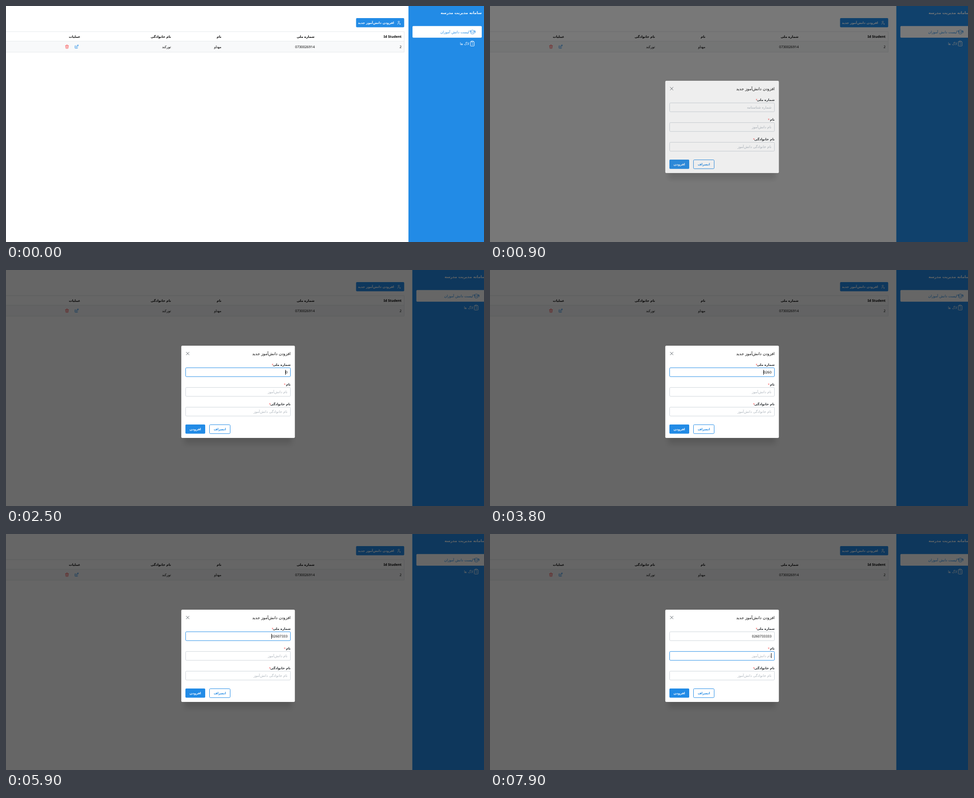
Animation, 1063 px wide and 527 px high, one loop 8 s. Source, as an HTML page:

```html
<!DOCTYPE html>
<html lang="fa">
<head>
<meta charset="utf-8">
<title>سامانه مدیریت مدرسه</title>
<style>
  html, body { margin: 0; width: 100%; height: 100%; overflow: hidden; background: #fff; }
  svg { display: block; width: 100%; height: 100%; }
  text { font: 7.8px "DejaVu Sans", sans-serif; text-anchor: end; text-rendering: geometricPrecision; }
  .bold { font-size: 7.1px; font-weight: 700; }
  .num { font: 7.6px "Noto Sans", "Open Sans", sans-serif; }
  .num.bold { font-weight: 700; }
  .head { font-size: 8.3px; font-weight: 700; }
  .title { font-size: 8.9px; }
  .mid { text-anchor: middle; }
  .icon { fill: none; stroke-linecap: round; stroke-linejoin: round; }
</style>
</head>
<body>
<svg id="stage" viewBox="0 0 1063 527" xmlns="http://www.w3.org/2000/svg"></svg>
<script>
const BLUE = '#228be6', HOVER = '#1c7ed6', RED = '#fa5252';
const LINE = '#dee2e6', BORDER = '#ced4da', HINT = '#adb5bd', INK = '#000';
const LOOP = 8000;
const ID_NUMBER = '0260733333';
const PUPIL = 'دانش&zwnj;آموز';

const PATHS = {
  userPlus: 'M8 7a4 4 0 1 0 8 0a4 4 0 0 0-8 0M16 19h6M19 16v6M6 21v-2a4 4 0 0 1 4-4h4',
  edit: 'M7 7h-1a2 2 0 0 0-2 2v9a2 2 0 0 0 2 2h9a2 2 0 0 0 2-2v-1M20.4 6.6a2.1 2.1 0 0 0-3-3l-8.4 8.4v3h3zM16 5l3 3',
  trash: 'M4 7h16M10 11v6M14 11v6M5 7l1 12a2 2 0 0 0 2 2h8a2 2 0 0 0 2-2l1-12M9 7v-3a1 1 0 0 1 1-1h4a1 1 0 0 1 1 1v3',
  school: 'M22 9l-10-4l-10 4l10 4l10-4v6M6 10.6v5.4a6 3 0 0 0 12 0v-5.4',
  clipboard: 'M9 5h-2a2 2 0 0 0-2 2v12a2 2 0 0 0 2 2h10a2 2 0 0 0 2-2v-12a2 2 0 0 0-2-2h-2M9 3h6v4h-6zM9 12h.01M13 12h2M9 16h.01M13 16h2',
  close: 'M5 5l14 14M19 5l-14 14'
};

const text = (x, y, str, cls = '', fill = INK, id = '') =>
  `<text x="${x}" y="${y}" class="${cls}" fill="${fill}" ${id && `id="${id}"`}>${str}</text>`;

const box = (x, y, w, h, fill, more = '') =>
  `<rect x="${x}" y="${y}" width="${w}" height="${h}" fill="${fill}" ${more}/>`;

const icon = (name, cx, cy, size, color, weight = 2) =>
  `<path class="icon" d="${PATHS[name]}" stroke="${color}" stroke-width="${weight}"
    transform="translate(${cx - size / 2} ${cy - size / 2}) scale(${size / 24})"/>`;

// One labelled form row; y is the top edge of its input.
const field = (n, y, label, starX, hint) =>
  text(633, y - 4.2, label, 'bold', '#212529') +
  text(starX, y - 3.4, '*', 'num', RED) +
  box(399.5, y + .3, 233, 19.8, '#fff', `rx="2" stroke="${BORDER}" id="input${n}"`) +
  text(626, y + 13, hint, '', HINT, 'hint' + n);

const page =
  box(0, 0, 1063, 527, '#fff') +
  box(778.5, 27, 107, 20.5, BLUE, 'rx="2" id="add"') +
  text(863, 40.2, `افزودن ${PUPIL} جدید`, 'bold', '#fff') +
  icon('userPlus', 873.5, 37.4, 9.6, '#fff') +
  box(0, 79, 885, 24, '#f8f9fa') +
  `<path d="M0 57.2H885.5V103H0M0 78.6H885.5" fill="none" stroke="${LINE}" stroke-width=".8"/>` +
  text(879.5, 70.8, 'Id Student', 'num bold') +
  text(686, 70.6, 'شماره ملی', 'bold') +
  text(479, 70.6, 'نام', 'bold') +
  text(367, 70.6, 'نام خانوادگی', 'bold') +
  text(165, 70.6, 'عملیات', 'bold') +
  text(879.5, 93.8, '2', 'num') +
  text(686.5, 93.8, '0730026914', 'num') +
  text(479, 93.5, 'مهتاو') +
  text(367, 93.5, 'تورکند') +
  icon('edit', 157, 90.8, 11, BLUE) +
  icon('trash', 135.6, 90.8, 10.5, RED);

const sidebar = `<g id="side">` +
  box(895, 0, 180, 527, BLUE) +
  text(1058, 18, 'سامانه مدیریت مدرسه', 'head', '#fff') +
  box(904, 44.7, 154, 26, '#fff', 'rx="2"') +
  text(1030, 61, 'لیست دانش آموزان', '', BLUE) +
  icon('school', 1037.3, 58, 15, BLUE, 1.5) +
  text(1030, 86.8, 'لاگ ها', '', '#fff') +
  icon('clipboard', 1037, 83.8, 15, '#fff', 1.5) + `</g>`;

const modal = `<g id="modal">` +
  box(397, 190, 238, 198, '#000', 'opacity=".13" filter="url(#soft)"') +
  box(389.8, 169, 252.6, 206, '#fff', 'rx="2.5"') +
  text(633, 189.8, `افزودن ${PUPIL} جدید`, 'title') +
  icon('close', 404, 186.5, 11, '#495057') +
  field(1, 218, 'شماره ملی', 595, 'شماره شناسنامه') +
  field(2, 262, 'نام', 622, `نام ${PUPIL}`) +
  field(3, 306, 'نام خانوادگی', 589, `نام خانوادگی ${PUPIL}`) +
  text(626, 231.3, '', 'num', INK, 'typed') +
  box(625, 223, 1, 11, INK, 'id="caret"') +
  box(399, 345, 44, 20.6, BLUE, 'rx="2"') +
  text(421, 358.3, 'افزودن', 'bold mid', '#fff') +
  box(452.5, 345.5, 46, 19.8, '#fff', `rx="2" stroke="${BLUE}"`) +
  text(475.5, 358.3, 'انصراف', 'bold mid', BLUE) + `</g>`;

document.getElementById('stage').innerHTML =
  `<defs><filter id="soft" x="-20%" y="-20%" width="140%" height="140%">
    <feGaussianBlur stdDeviation="6"/></filter></defs>` +
  page + sidebar + box(0, 0, 1063, 527, '#000', 'id="shade"') + modal;

const el = id => document.getElementById(id);
const [add, side, shade, dialog, input1, input2, hint1, typed, caret] =
  ['add', 'side', 'shade', 'modal', 'input1', 'input2', 'hint1', 'typed', 'caret'].map(el);
const set = (node, attrs) => {
  for (const key in attrs) node.setAttribute(key, attrs[key]);
};

const KEYS = [2500, 2700, 2900, 3800, 4000, 4700, 4900, 5900, 6300, 6600];
const FOCUS = 1500, NEXT = 6900;

const openness = t => t < 800 ? 0 : t < 900 ? .067 : t < 1000 ? .88 : 1;

const mix = (a, b, k) => {
  const part = (c, i) => parseInt(c.slice(i, i + 2), 16);
  return `rgb(${[1, 3, 5].map(i => Math.round(part(a, i) + (part(b, i) - part(a, i)) * k))})`;
};

function draw(t) {
  const p = openness(t);
  set(add, { fill: t >= 200 && t < 900 ? HOVER : BLUE });
  set(side, { transform: `translate(${t >= 700 ? 8.6 : 0} 0)` });
  set(shade, { opacity: .6 * p });
  set(dialog, { opacity: p, transform: `translate(0 ${-16.3 * (1 - p)})` });

  const count = KEYS.filter(k => k <= t).length;
  typed.textContent = ID_NUMBER.slice(0, count);
  set(hint1, { opacity: count ? 0 : 1 });

  const moved = t < NEXT ? 0 : t < NEXT + 100 ? .5 : 1;
  set(input1, { stroke: t < FOCUS ? BORDER : mix(BLUE, BORDER, moved) });
  set(input2, { stroke: mix(BORDER, BLUE, moved) });

  // The caret blinks every 500 ms, counted from the last key or focus.
  const last = Math.max(...[FOCUS, ...KEYS, NEXT].filter(k => k <= t));
  const lit = t >= FOCUS && Math.floor((t - last) / 500) % 2 === 0;
  set(caret, {
    opacity: lit ? 1 : 0,
    x: moved ? 625 : Math.floor(625.9 - 4.37 * count),
    y: moved ? 266 : 223
  });
}

const start = performance.now();
function tick() {
  draw((performance.now() - start) % LOOP);
  requestAnimationFrame(tick);
}
tick();
</script>
</body>
</html>
```
